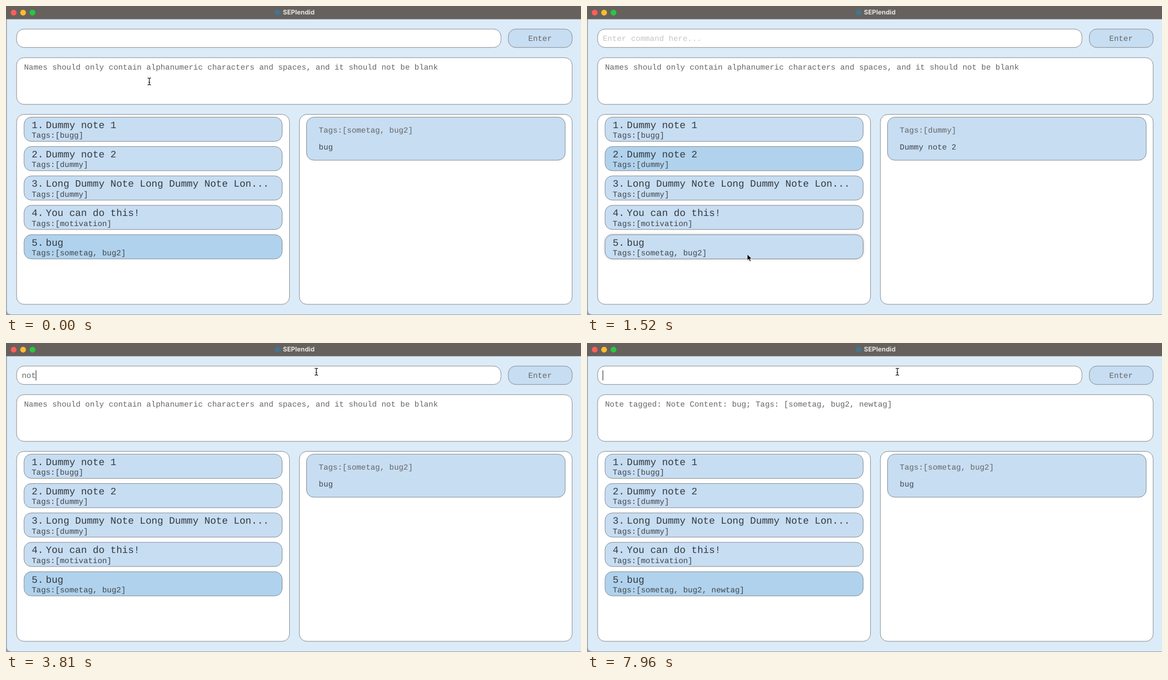
An HTML page that plays this animation: 1019 px wide and 549 px high, repeating every 8 s.

```html
<!DOCTYPE html>
<html lang="en">
<head>
<meta charset="utf-8">
<title>SEPlendid</title>
<style>
html, body { margin: 0; width: 100%; height: 100%; overflow: hidden; background: #98a0a8; }
svg { display: block; width: 1019px; height: 549px; }
text {
  font: 13.9px "Liberation Mono", "Courier New", monospace;
  fill: #666; white-space: pre; text-rendering: geometricPrecision;
}
.name { font-size: 17.35px; fill: #343a40; }
.tags { fill: #40474d; }
.title { font: 700 11.4px Inter, "Open Sans", sans-serif; fill: #e6e3e1; }
.box { fill: #fff; stroke: #8b8f93; }
.card { fill: #c7ddf2; stroke: #868e96; }
.card.on { fill: #b0d2ed; }
.card.hover { filter: drop-shadow(0 0 2px rgba(0, 0, 0, .22)); }
</style>
</head>
<body>
<svg id="stage" viewBox="0 0 1019 549"></svg>
<script>
const LOOP = 8000, CHAR = 8.34, KEY_GAP = 76, BLINK = 490, POINTER_STEP = 80;
const CLICK = 550, FOCUS = 3410, SUBMIT = 7960;
const stage = document.getElementById("stage");

function add(tag, attrs, content = "") {
  const el = document.createElementNS("http://www.w3.org/2000/svg", tag);
  for (const k in attrs) el.setAttribute(k, attrs[k]);
  el.textContent = content;
  stage.appendChild(el);
  return el;
}
const box = (x, y, r, b, cls = "box") =>
  add("rect", { x, y, width: r - x, height: b - y, rx: 13, class: cls });
const label = (x, y, content = "", cls = "") => add("text", { x, y, class: cls }, content);
const show = (el, on) => el.setAttribute("visibility", on ? "visible" : "hidden");

const notes = [
  ["Dummy note 1", "[bugg]"],
  ["Dummy note 2", "[dummy]"],
  ["Long Dummy Note Long Dummy Note Lon...", "[dummy]"],
  ["You can do this!", "[motivation]"],
  ["bug", "[sometag, bug2]"]
];
const cardTop = i => 197.5 + i * 52.2;

// Window frame and title bar
add("path", { d: "M1.5 0H1019V548H10Q1.5 548 1.5 540Z", fill: "#dcebf8" });
add("rect", { width: 1019, height: 23.5, fill: "#67615e" });
["#fe5f57", "#febc2e", "#28c840"].forEach((fill, i) =>
  add("circle", { cx: 13.6 + i * 16.7, cy: 11.8, r: 5.1, fill }));
add("circle", { cx: 481.5, cy: 11.5, r: 5, fill: "#3f7690" });
label(490.7, 15.2, "SEPlendid", "title");

// Panels
box(18.8, 41, 877.2, 73.7);
box(890.3, 41, 1003.3, 73.7, "card");
label(925.6, 62, "Enter");
box(18.8, 91.8, 1003.3, 174.8);
box(18.8, 192.6, 502.4, 530);
box(520, 192.6, 1003.3, 530);

const cards = notes.map((_, i) => box(32, cardTop(i), 489.4, cardTop(i) + 43, "card"));
const tagLines = notes.map(([name], i) => {
  const y = cardTop(i);
  label(45.5, y + 19.2, i + 1 + ".", "name");
  label(70.5, y + 19.2, name, "name");
  return label(45.5, y + 36.7, "", "tags");
});
box(532.6, 197.5, 991, 274, "card");
const detailTags = label(554.3, 225.2);
const detailName = label(554.3, 255.2, "", "tags");
const result = label(32, 113);
const input = label(28, 62);
const caret = add("rect", { y: 48.5, width: 1.1, height: 18, fill: "#333" });

const arrow = add("path", {
  d: "M0 0V11.2L2.7 8.8L4.6 13L6.6 12.1L4.8 8H8.2Z",
  fill: "#000", stroke: "#fff", "stroke-width": .8
});
const beam = add("path", {
  d: "M-3-6.2Q0-6.2 0-4.5Q0-6.2 3-6.2M0-5V5M-3 6.2Q0 6.2 0 4.5Q0 6.2 3 6.2M-1.5 1.5H1.5",
  fill: "none", stroke: "#111", "stroke-width": 1.2
});

// Pointer moves: start, end, points passed at an even pace
const moves = [
  [80, 400, [254, 134], [217, 237]],
  [720, 960, [217, 237], [236, 274]],
  [1120, 1520, [236, 274], [284, 441]],
  [1840, 2160, [284, 441], [727, 352]],
  [2160, 2800, [727, 352], [758, 296], [735, 206], [648, 272], [716, 227]],
  [2880, 3360, [716, 227], [550, 51]]
];

function pointerAt(time) {
  const t = Math.floor(time / POINTER_STEP) * POINTER_STEP;
  const [from, to, ...path] = moves.findLast(m => m[0] <= t) || moves[0];
  const last = path.length - 1;
  const p = Math.min(1, Math.max(0, (t - from) / (to - from))) * last;
  const i = Math.min(last - 1, Math.floor(p));
  return path[i].map((v, k) => v + (path[i + 1][k] - v) * (p - i));
}

// Bursts of typing: start, keys
const bursts = [
  [3650, "note "], [3970, "tag "], [4440, "["], [5510, "5"], [5750, "]"],
  [6000, " "], [6410, "["], [6660, "new"], [6980, "tag]"]
];
const keys = bursts.flatMap(([start, text]) =>
  [...text].map((char, i) => ({ char, time: start + i * KEY_GAP })));

function selectedAt(t) {
  if (t < CLICK) return 4;
  return t < 960 ? 0 : t < 1600 ? 1 : 4;
}

// The caret lights up on focus or a key, then blinks
function caretOn(t, idle, typed) {
  if (t < 240 || idle) return false;
  const since = t >= SUBMIT ? SUBMIT : typed.length ? typed.at(-1).time : t < CLICK ? 240 : FOCUS;
  return Math.floor((t - since) / BLINK) % 2 === 0;
}

function render(t) {
  const [x, y] = pointerAt(t);
  const overText = x < 877 && y > 41 && y < 74 || y > 92 && y < 175;
  show(beam, overText);
  show(arrow, !overText);
  (overText ? beam : arrow).setAttribute("transform", `translate(${x} ${y})`);

  const chosen = selectedAt(t), done = t >= SUBMIT;
  cards.forEach((card, i) => {
    const top = cardTop(i);
    card.classList.toggle("on", i === chosen);
    card.classList.toggle("hover", x > 32 && x < 489 && y >= top && y <= top + 43);
    tagLines[i].textContent = "Tags:" + (done && i === 4 ? "[sometag, bug2, newtag]" : notes[i][1]);
  });
  detailTags.textContent = "Tags:" + notes[chosen][1];
  detailName.textContent = notes[chosen][0];

  const idle = t >= CLICK && t < FOCUS;
  const typed = done ? [] : keys.filter(k => k.time <= t);
  input.textContent = idle ? "Enter command here..." : typed.map(k => k.char).join("");
  input.style.fill = idle ? "#c6c6c6" : "#666";
  caret.setAttribute("x", 27.6 + typed.length * CHAR);
  show(caret, caretOn(t, idle, typed));

  result.textContent = done
    ? "Note tagged: Note Content: bug; Tags: [sometag, bug2, newtag]"
    : "Names should only contain alphanumeric characters and spaces, and it should not be blank";
}

const start = performance.now();
function tick() {
  render((performance.now() - start) % LOOP);
  requestAnimationFrame(tick);
}
tick();
</script>
</body>
</html>
```
